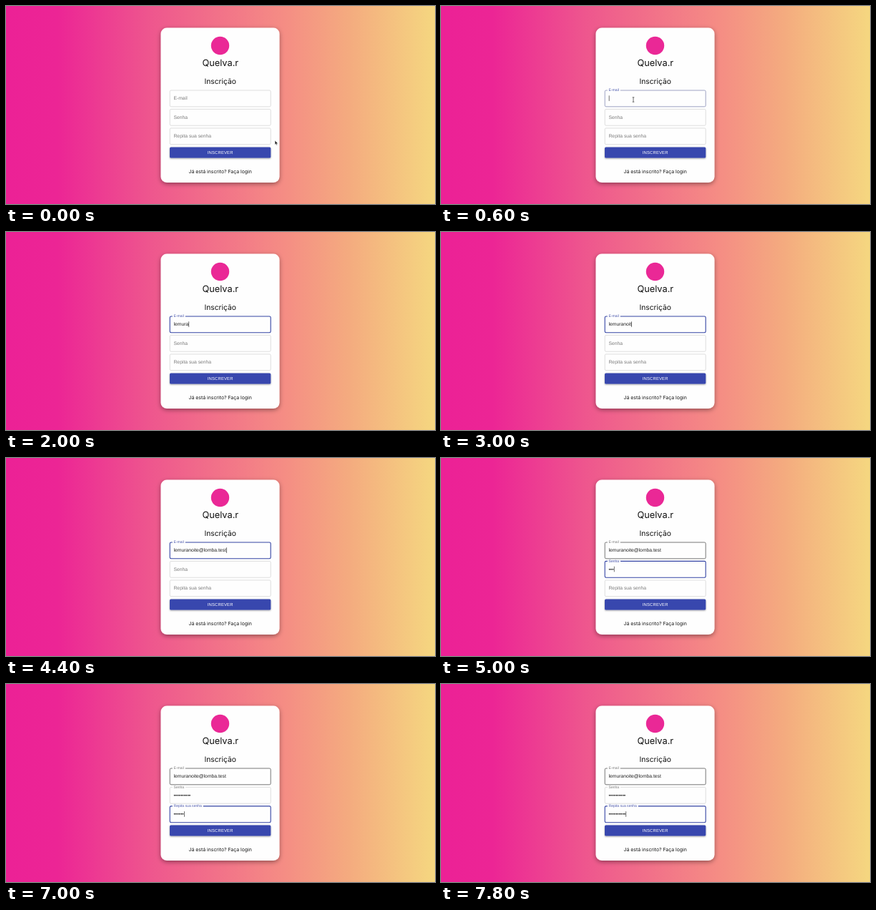
Animation, 600 px wide and 277 px high, one loop 8000 ms. Source, as an HTML page:

```html
<!DOCTYPE html>
<html lang="pt-BR">
<head>
<meta charset="utf-8">
<title>Inscrição</title>
<style>
  html, body { margin: 0; width: 100%; height: 100%; overflow: hidden; }
  svg { display: block; width: 100%; height: 100%; }
  text { font-family: "Liberation Sans", Arial, sans-serif; font-size: 6.75px; text-rendering: geometricPrecision; white-space: pre; }
  .heading { font-family: Inter, sans-serif; text-anchor: middle; fill: #111; }
</style>
</head>
<body>
<svg viewBox="0 0 600 277" preserveAspectRatio="none">
  <defs>
    <linearGradient id="sky">
      <stop offset="0" stop-color="#ec2196"/>
      <stop offset=".12" stop-color="#ec2595"/>
      <stop offset=".33" stop-color="#ee558e"/>
      <stop offset=".65" stop-color="#f58d84"/>
      <stop offset=".8" stop-color="#f4ab7f"/>
      <stop offset="1" stop-color="#f5d780"/>
    </linearGradient>
    <filter id="cardShadow" x="-20%" y="-20%" width="140%" height="140%">
      <feDropShadow dx="0" dy="2" stdDeviation="3" flood-opacity=".4"/>
    </filter>
    <filter id="buttonShadow" x="-10%" y="-40%" width="120%" height="200%">
      <feDropShadow dx="0" dy=".9" stdDeviation=".8" flood-opacity=".4"/>
    </filter>
  </defs>
  <rect width="600" height="277" fill="url(#sky)"/>
  <rect x="216.5" y="30.5" width="166" height="216.5" rx="8.5" fill="#fefefe" filter="url(#cardShadow)"/>
  <circle cx="299.5" cy="55.5" r="12.7" fill="#ea2896"/>
  <text class="heading" x="299.8" y="83.7" style="font-size:12.8px">Quelva.r</text>
  <text class="heading" x="299.7" y="108.7" style="font-size:10.3px">Inscrição</text>
  <g id="fields"></g>
  <rect x="229" y="197.4" width="141.3" height="15.2" rx="1.7" fill="#3946ae" filter="url(#buttonShadow)"/>
  <text x="299.7" y="207.2" text-anchor="middle" fill="#fff" style="font-size:5.9px;letter-spacing:.17px">INSCREVER</text>
  <text class="heading" x="299.7" y="233.8" style="font-size:6.9px">Já está inscrito? Faça login</text>
  <path id="arrow" d="M0 0V5.6L1.3 4.4 2.2 6.4 3.1 6 2.2 4.1H4Z" fill="#111" stroke="#fff" stroke-width=".4"/>
  <path id="beam" d="M-1.3-3.2H1.3M0-3.2V3.2M-1.3 3.2H1.3" fill="none" stroke="#333" stroke-width=".7"/>
</svg>
<script>
const LOOP = 8000, STEP = 200, FADE = 200, LEFT = 234.5;
const BLUE = "#3444a4";
const clamp = v => Math.max(0, Math.min(1, v));
const easeOut = p => 1 - (1 - p) ** 3;

// Linear interpolation through [time, value] points.
function track(points, t) {
  if (t <= points[0][0]) return points[0][1];
  for (let i = 1; i < points.length; i++) {
    const [t0, v0] = points[i - 1], [t1, v1] = points[i];
    if (t <= t1) return v0 + (v1 - v0) * (t - t0) / (t1 - t0);
  }
  return points.at(-1)[1];
}

function add(parent, tag, attrs, text = "") {
  const node = document.createElementNS("http://www.w3.org/2000/svg", tag);
  set(node, attrs);
  node.textContent = text;
  return parent.appendChild(node);
}

function set(node, attrs) {
  for (const key in attrs) node.setAttribute(key, attrs[key]);
}

const password = "•".repeat(10);
const fields = [
  { label: "E-mail", top: 118, focus: 450, blur: 4550, hover: true, value: "lemuranoite@lomba.test",
    typing: [[1000, 0], [2000, 6], [3000, 10], [4400, 22]] },
  { label: "Senha", top: 144.4, focus: 4550, blur: 5965, value: password,
    typing: [[4700, 0], [5700, 10]] },
  { label: "Repita sua senha", top: 170.9, focus: 5965, blur: Infinity, value: password,
    typing: [[6200, 0], [7400, 10]] }
];

for (const field of fields) {
  const group = add(document.getElementById("fields"), "g", {});
  field.box = add(group, "rect", { x: 229.2, y: field.top, width: 141, height: 22.8, rx: 1.7, fill: "none" });
  field.notch = add(group, "rect", { x: 232.8, y: field.top - 1, height: 2.2, fill: "#fefefe" });
  field.labelNode = add(group, "text", {}, field.label);
  field.valueNode = add(group, "text", { x: LEFT, y: field.top + 13.3, fill: "#222" });
  field.caret = add(group, "rect", { y: field.top + 7.3, width: .65, height: 7.6, fill: "#222" });
}

function borderStyle(field, t, focused, fading) {
  if (focused) return fading ? ["#868cb4", .8] : [BLUE, 1.1];
  if (t >= field.blur) {
    if (field.hover) return ["#555", .8];
    if (fading) return ["#9298c2", .7];
  }
  return ["#c8c8c8", .6];
}

function drawField(field, t) {
  const focused = t >= field.focus && t < field.blur;
  const lift = easeOut(clamp((t - field.focus) / FADE));
  const fading = t - (focused ? field.focus : field.blur) < FADE;
  const [stroke, width] = borderStyle(field, t, focused, fading);
  set(field.box, { stroke, "stroke-width": width });

  const labelWidth = field.labelNode.getComputedTextLength();
  set(field.notch, { width: lift > .6 ? labelWidth * .75 + 3.6 : 0 });
  set(field.labelNode, {
    transform: `translate(${LEFT} ${field.top + 13.4 - 12.2 * lift}) scale(${1 - .25 * lift})`,
    fill: focused ? "#4a57ad" : "#7c7c7c"
  });

  field.valueNode.textContent = field.value.slice(0, Math.floor(track(field.typing, t) + 1e-6));
  set(field.caret, {
    x: LEFT + .3 + field.valueNode.getComputedTextLength(),
    visibility: focused ? "visible" : "hidden"
  });
}

function drawPointer(t) {
  const x = track([[0, 376.2], [500, 269]], t);
  const y = track([[0, 188.3], [500, 131]], t);
  const overField = x < 370;
  const typing = t > 1100;
  const place = (id, visible) => set(document.getElementById(id), {
    transform: `translate(${x} ${y})`,
    visibility: visible ? "visible" : "hidden"
  });
  place("arrow", !overField);
  place("beam", overField && !typing);
}

function draw(now) {
  const t = Math.floor(now % LOOP / STEP) * STEP;
  fields.forEach(field => drawField(field, t));
  drawPointer(t);
  requestAnimationFrame(draw);
}
draw(0);
</script>
</body>
</html>
```
